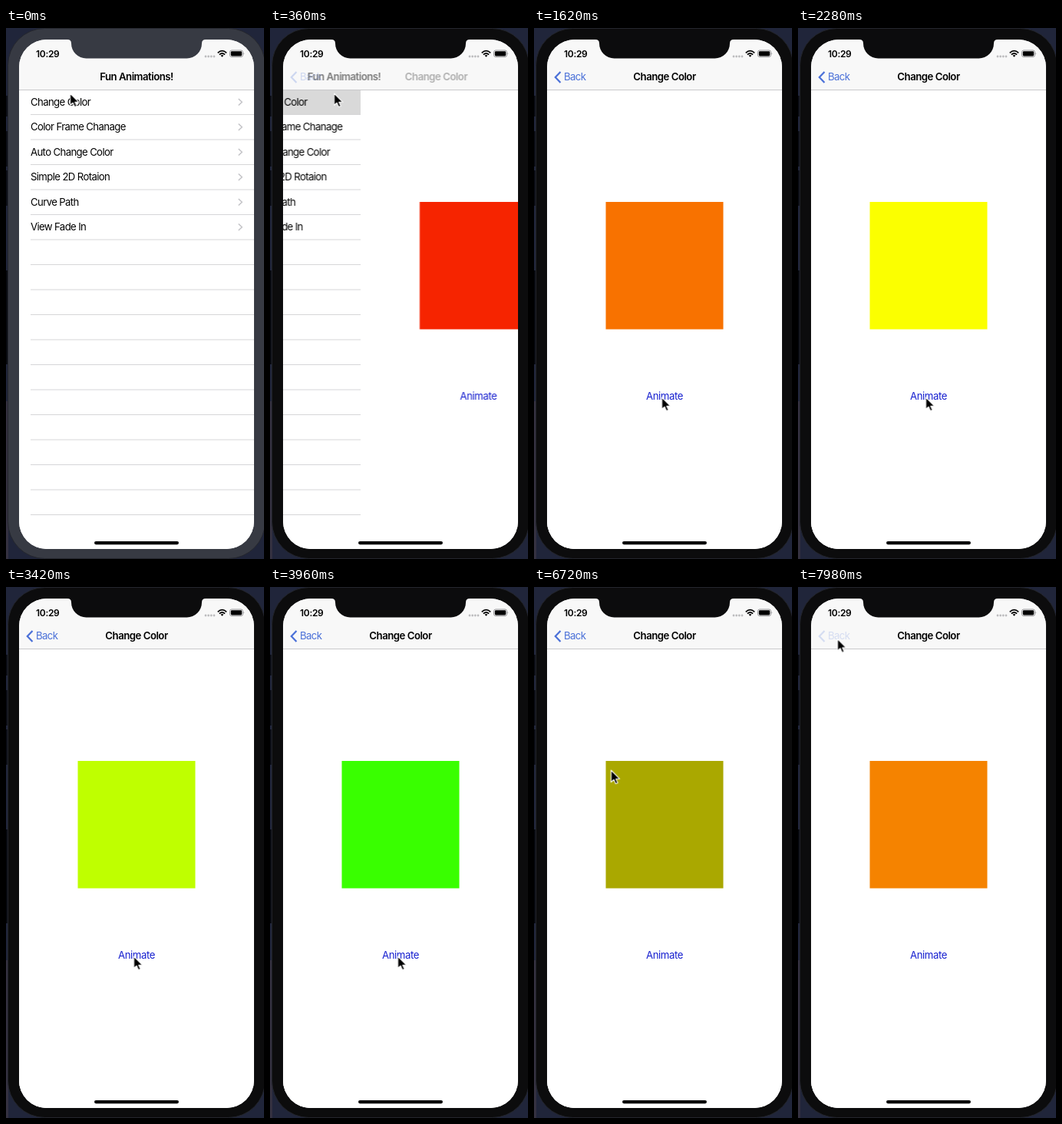
Animation of 336x690 px, one loop 8000 ms. Source, as an HTML page:

```html
<!DOCTYPE html>
<html lang="en">
<head>
<meta charset="utf-8">
<title>Fun Animations</title>
<style>
  html, body { margin: 0; width: 100%; height: 100%; overflow: hidden; background: #1d2132; }
  svg { display: block; width: 336px; height: 690px; }
  text { font: 400 13.2px Inter, Roboto, sans-serif; letter-spacing: -.64px; fill: #000; }
  .title { font-weight: 600; letter-spacing: -.5px; text-anchor: middle; }
  .time { font-weight: 600; font-size: 12px; letter-spacing: -.3px; }
  .action { fill: #1720d0; letter-spacing: -.45px; text-anchor: middle; }
  .line { stroke: #d6d6d8; }
  .arrow { fill: none; stroke: #c3c3c7; stroke-width: 1.5; }
</style>
</head>
<body>
<svg viewBox="0 0 336 690">
  <defs>
    <clipPath id="screen"><rect x="17" y="15" width="306" height="662" rx="36"/></clipPath>
  </defs>

  <!-- desktop and side buttons -->
  <rect width="336" height="690" fill="#20253a"/>
  <rect y="315" width="3" height="122" fill="#080a10"/>
  <rect y="485" width="3" height="205" fill="#343140"/>
  <g fill="#0c0e16">
    <rect y="88" width="3" height="27"/>
    <rect y="134" width="3" height="46"/>
    <rect y="185" width="3" height="46"/>
  </g>

  <rect id="bezel" x="2.5" y=".5" width="335" height="689" rx="48" fill="#0c0c0d" stroke="#24262d"/>

  <g clip-path="url(#screen)">
    <rect x="17" y="15" width="306" height="662" fill="#fff"/>
    <g id="list"></g>
    <g id="detail">
      <rect x="17" y="80" width="306" height="597" fill="#fff"/>
      <rect id="square" x="93.5" y="226" width="153" height="165.5" fill="#f62400"/>
      <text class="action" x="170" y="483">Animate</text>
    </g>

    <rect x="17" y="15" width="306" height="65" fill="#f8f8f8"/>
    <path d="M17 80.5H323" stroke="#c9c9cb"/>
    <text id="listTitle" class="title" x="170" y="68.3">Fun Animations!</text>
    <text id="detailTitle" class="title" x="170" y="68.3">Change Color</text>
    <g id="back">
      <path d="M34.5 57L27.8 64L34.5 71" fill="none" stroke="#4a70d8" stroke-width="2.2"/>
      <text x="39" y="68.3" style="fill:#4a70d8">Back</text>
    </g>

    <text class="time" x="39" y="37.8">10:29</text>
    <g fill="#bcbcbe">
      <circle cx="260" cy="37" r="1.4"/><circle cx="263.7" cy="37" r="1.4"/>
      <circle cx="267.3" cy="37" r="1.4"/><circle cx="271" cy="37" r="1.4"/>
    </g>
    <g fill="none" stroke="#000" stroke-width="1.8">
      <path d="M275.8 32.3Q281.5 27 287.2 32.3M277.9 34.6Q281.5 31.3 285.1 34.6"/>
      <path d="M279.6 35.8Q281.5 34.3 283.4 35.8L281.5 37.8Z" fill="#000" stroke="none"/>
    </g>
    <rect x="291.5" y="29" width="17" height="8.6" rx="2.4" fill="none" stroke="#8d8d8f" stroke-width=".9"/>
    <rect x="292.8" y="30.2" width="14.4" height="6.2" rx="1.3"/>
    <path d="M309.6 31.8Q311.2 33.3 309.6 34.8Z" fill="#8d8d8f"/>
    <rect x="115" y="667" width="110" height="4.2" rx="2.1"/>
  </g>

  <path id="notch" fill="#0c0c0d" d="M80 14V15Q85 15 85 20A19.5 19.5 0 0 0 104.500 39.500H235.500A19.500 19.500 0 0 0 255 20Q255 15 260 15V14Z"/>

  <path id="cursor" d="M0 0V15.500L3.600 12.200L6 17.600L8.700 16.400L6.300 11.200H11Z" fill="#000" stroke="#fff" stroke-width="1.1" stroke-linejoin="round"/>
</svg>

<script>
  const LOOP = 8000;
  const ROW = 32.5, TOP = 80;
  const names = ['Change Color', 'Color Frame Chanage', 'Auto Change Color',
    'Simple 2D Rotaion', 'Curve Path', 'View Fade In'];

  const rows = names.map((name, i) => {
    const y = TOP + ROW * (i + .5);
    return `<text x="32" y="${y + 4.6}">${name}</text>
      <path class="arrow" d="M302.8 ${y - 4.300}l4.500 4.300l-4.500 4.300"/>`;
  });
  const lines = Array.from({ length: 17 }, (_, i) =>
    `<path class="line" d="M32 ${TOP + ROW * (i + 1)}H323"/>`);
  document.getElementById('list').innerHTML =
    `<rect x="17" y="80" width="306" height="597" fill="#fff"/>
     <rect id="highlight" x="17" y="80" width="306" height="32.5" fill="#d9d9d9"/>`
    + lines.join('') + rows.join('');

  // Each step is [time, value, easing towards the next step].
  function play(id, property, steps) {
    const first = steps[0], last = steps[steps.length - 1];
    const all = [[0, first[1]], ...steps, [LOOP, last[1]]];
    const frames = all.map(([time, value, easing = 'linear']) =>
      ({ offset: time / LOOP, [property]: value, easing }));
    document.getElementById(id).animate(frames, { duration: LOOP, iterations: Infinity });
  }

  const move = (x, y = 0) => `translate(${x}px, ${y}px)`;
  const HOLD = 'step-end';
  const PRESS = 180, PUSH = 240, PUSHED = 740;
  const GLIDE = 'cubic-bezier(.25, .8, .3, 1)';

  for (const id of ['bezel', 'notch'])
    play(id, 'fill', [[PRESS, '#373a43', HOLD], [PRESS + 1, '#0c0c0d']]);

  play('highlight', 'opacity', [[PRESS, 0, HOLD], [PRESS + 1, 1]]);
  play('list', 'transform', [[PUSH, move(0), GLIDE], [PUSHED, move(-92)]]);
  play('detail', 'transform', [[PUSH, move(306), GLIDE], [PUSHED, move(0)]]);
  play('listTitle', 'transform', [[PUSH, move(0), GLIDE], [PUSHED, move(-110)]]);
  play('listTitle', 'opacity', [[PUSH, 1], [PUSH + 250, 0]]);
  play('detailTitle', 'transform', [[PUSH, move(140), GLIDE], [PUSHED, move(0)]]);
  play('detailTitle', 'opacity', [[PUSH, 0], [PUSHED - 100, 1]]);
  play('back', 'opacity', [[PUSH, 0], [PUSHED, 1], [7920, 1, HOLD], [7921, .2]]);

  play('square', 'fill', [
    [1230, '#f62400', 'ease-in-out'], [2170, '#fbff00'],
    [3050, '#fbff00', 'ease-in'], [3420, '#bfff00', 'ease-out'], [3990, '#38ff00'],
    [6150, '#38ff00', 'ease-in'], [6720, '#aaa800', 'ease-out'], [7100, '#f58300']
  ]);

  play('cursor', 'transform', [
    [420, move(83.5, 85), 'ease-in-out'], [1080, move(166.5, 480)],
    [6260, move(166.5, 480), 'ease-in'], [6720, move(100.5, 238.5), 'ease-out'],
    [7400, move(51.5, 67.5)]
  ]);
</script>
</body>
</html>
```
